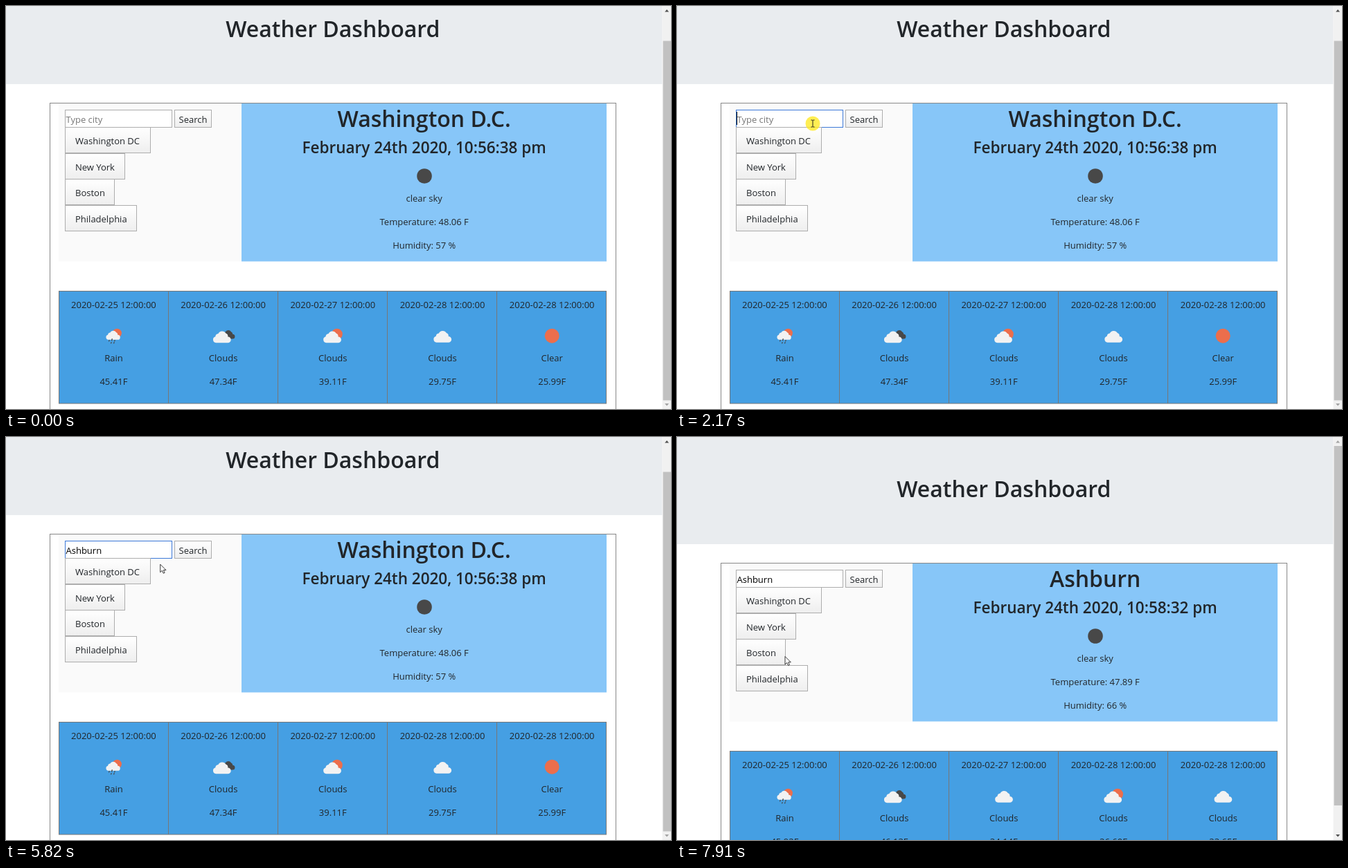
An HTML page that plays this animation: 960x583 px, repeating every 7.99 s.

```html
<!DOCTYPE html>
<html lang="en">
<head>
<meta charset="utf-8">
<title>Weather Dashboard</title>
<style>
html, body { margin: 0; width: 100%; height: 100%; overflow: hidden; background: #fff; }
svg { display: block; width: 100%; height: 100%; }
text { font: 13px "Open Sans", "Noto Sans", sans-serif; fill: #212529; white-space: pre; }
.mid { text-anchor: middle; }
.h1 { font-size: 32px; font-weight: 600; }
.h2 { font-size: 22.5px; font-weight: 600; }
.box { stroke: #adadad; }
</style>
</head>
<body>
<svg viewBox="0 0 960 583">
  <defs>
    <linearGradient id="face" x2="0" y2="1">
      <stop stop-color="#fff"/><stop offset="1" stop-color="#eee"/>
    </linearGradient>
    <path id="cloud" d="M-8.5 9A4.6 4.6 0 0 1-9.3 0A4.6 4.6 0 0 1-5.2-4.2A6.3 6.3 0 0 1 5.8-4.6A4.8 4.8 0 0 1 8.8 .2A4.4 4.4 0 0 1 8.6 9Z"/>
  </defs>
  <g id="page"></g>
  <g id="bar">
    <path d="M947.5 0H960V583H947.5Z" fill="#f1f1f1"/>
    <rect id="thumb" x="948.5" width="11.5" height="520" fill="#c1c1c1"/>
    <path id="up" d="M951 8.5h6l-3-3.5z"/>
    <path id="down" d="M951 575h6l-3 3.5z"/>
  </g>
  <g id="mouse">
    <circle id="halo" r="10.5" fill="#ffe81a" opacity=".75"/>
    <path id="arrow" d="M.5 .5V12L3.2 9.5L5 13.5L6.9 12.7L5.2 8.8H8.8Z" fill="#fff" stroke="#222" stroke-width=".9"/>
    <path id="beam" d="M-2.5-5H-.5L0-4.5L.5-5H2.5M0-4.5V4.5M-2.5 5H-.5L0 4.5L.5 5H2.5" fill="none" stroke="#222"/>
  </g>
</svg>
<script>
const LOOP = 7990, SCROLL = 42, LOADED = 6660, FOCUS = 2170, PRESS = 6370;
const $ = id => document.getElementById(id);
const set = (id, name, value) => $(id).setAttribute(name, value);
const show = (id, on) => set(id, 'display', on ? 'inline' : 'none');

const rect = (x, y, w, h, fill, extra = '') =>
  `<rect x="${x}" y="${y}" width="${w}" height="${h}" fill="${fill}" ${extra}/>`;
const mid = (x, y, s, cls = '') => `<text x="${x}" y="${y}" class="mid ${cls}">${s}</text>`;
const cloud = (x, y, k = 1, fill = '#f2f2f2') =>
  `<use href="#cloud" transform="translate(${x} ${y}) scale(${k})" fill="${fill}"/>`;
const disc = (x, y, r, fill = '#ec6e4c') => `<circle cx="${x}" cy="${y}" r="${r}" fill="${fill}"/>`;

// Icons are drawn around their column's centre.
const icons = {
  rain: disc(5, -4, 6.5) + cloud(-1, -1.5, .79) +
    '<path d="M-6 6l-1 2M-2 4l-1 3M2 6l-1 2M-3 9l-1 2M1 9l-1 2" stroke="#484848" stroke-width="1.3"/>',
  broken: cloud(7, -2.5, .75, '#484848') + cloud(-2, 1),
  few: disc(6, -2.5, 8) + cloud(-1, 1),
  cloudy: cloud(0, 0.5),
  clear: disc(0, 0, 10.5)
};

const before = {
  city: 'Washington D.C.', time: '10:56:38', temp: '48.06', hum: 57,
  days: [['rain', 'Rain', 45.41], ['broken', 'Clouds', 47.34], ['few', 'Clouds', 39.11],
    ['cloudy', 'Clouds', 29.75], ['clear', 'Clear', 25.99]]
};
const after = {
  city: 'Ashburn', time: '10:58:32', temp: '47.89', hum: 66,
  days: [['rain', 'Rain', '45.93'], ['broken', 'Clouds', '46.13'], ['cloudy', 'Clouds', '34.14'],
    ['few', 'Clouds', '36.60'], ['cloudy', 'Clouds', '33.65']]
};

const report = (id, d) => `<g id="${id}">` +
  mid(603.7, 217, d.city, 'h1') +
  mid(603.7, 254.5, `February 24th 2020, ${d.time} pm`, 'h2') +
  disc(604, 288, 10.8, '#484848') +
  mid(603.7, 325, 'clear sky') +
  mid(603.7, 359, `Temperature: ${d.temp} F`) +
  mid(603.7, 393, `Humidity: ${d.hum} %`) +
  d.days.map(([icon, sky, deg], i) => {
    const x = 155.4 + i * 158.2, day = 25 + Math.min(i, 3);
    return mid(x, 479, `2020-02-${day} 12:00:00`) +
      `<g transform="translate(${x} 519.2)">${icons[icon]}</g>` +
      mid(x, 556, sky) + mid(x, 590, deg + 'F');
  }).join('') + '</g>';

const cities = [['Washington DC', 123], ['New York', 86], ['Boston', 71], ['Philadelphia', 103]];

$('page').innerHTML =
  rect(0, 0, 947.5, 155, '#e9ecef') +
  mid(471.8, 87, 'Weather Dashboard', 'h1') +
  rect(63.5, 182.5, 817, 500, '#fff', 'stroke="#888"') +
  rect(76, 183, 264, 228.5, '#fafafa') +
  rect(340, 183, 527, 228.5, '#87c6f8') +
  rect(85.5, 192.5, 154, 25, '#fff', 'id="field" class="box"') +
  '<text id="typed" x="86.5" y="210.5"></text>' +
  rect(0, 195, 1, 19, '#000', 'id="caret"') +
  rect(243.5, 192.5, 53, 25, 'url(#face)', 'id="search" class="box"') +
  mid(270, 210.5, 'Search') +
  cities.map(([name, w], i) => {
    const y = 217.5 + Math.round(i * 37.5);
    return rect(85.5, y, w, 37, 'url(#face)', 'class="box"') +
      `<text x="100" y="${y + 24.5}">${name}</text>`;
  }).join('') +
  rect(76.5, 454.5, 790, 162.5, '#459fe3', 'stroke="#777"') +
  [1, 2, 3, 4].map(i => rect(76 + i * 158, 454, 1, 163, '#777')).join('') +
  report('old', before) + report('new', after);

// start, end, steps, then start point, bend and end point of a curve
const moves = [
  [370, 520, 3, [932, 620], [773, 510], [455, 290]],
  [920, 1070, 3, [455, 290], [330, 215], [262, 167]],
  [1540, 2170, 9, [262, 167], [255, 167], [196, 170]],
  [5670, 6200, 8, [196, 170], [250, 207], [291, 167]],
  [6370, 6510, 3, [291, 167], [288, 166], [286.5, 166]],
  [7370, 7910, 8, [286.5, 166], [406, 225], [155.5, 317]]
];
const keys = [3250, 3560, 3880, 4420, 4630, 4800, 5120];

function mouseAt(t) {
  const [from, to, n, a, b, c] = moves.filter(m => t >= m[0]).pop();
  const step = Math.floor((t - from) / (to - from) * (n - 1) + 1e-6) + 1;
  const u = Math.min(1, step / n), v = 1 - u;
  return a.map((p, i) => v * v * p + 2 * u * v * b[i] + u * u * c[i]);
}

function draw(t) {
  const loaded = t >= LOADED;
  set('page', 'transform', `translate(0 ${loaded ? 0 : -SCROLL})`);
  set('thumb', 'y', loaded ? 13 : 50.5);
  set('up', 'fill', loaded ? '#a3a3a3' : '#505050');
  set('down', 'fill', loaded ? '#505050' : '#a3a3a3');
  show('old', !loaded);
  show('new', loaded);

  const visible = t >= 370;
  const [x, y] = visible ? mouseAt(t) : [0, 0];
  const inRow = !loaded && y > 150 && y < 176;
  const overField = inRow && x > 85 && x < 240;
  const overSearch = inRow && x > 243 && x < 297;
  show('mouse', visible);
  set('mouse', 'transform', `translate(${x} ${y})`);
  show('arrow', !overField);
  show('beam', overField);
  show('halo', t >= FOCUS && t < 2320 || t >= PRESS && t < LOADED);

  const focus = t >= FOCUS && t < PRESS;
  const count = keys.filter(k => t >= k).length;
  $('typed').textContent = 'Ashburn'.slice(0, count) || 'Type city';
  $('typed').style.fill = count ? '#000' : '#767676';
  $('field').style.stroke = focus ? '#3b78d8' : overField ? '#777' : '';
  $('search').style.stroke = overSearch && t < PRESS ? '#777' : '';
  $('search').style.fill = overSearch && t >= PRESS ? '#f0f0f0' : '';

  const last = count ? keys[count - 1] : FOCUS;
  show('caret', focus && Math.floor((t - last) / 540) % 2 === 0);
  set('caret', 'x', 86 + (count ? $('typed').getComputedTextLength() : 0));
}

const start = performance.now();
(function tick() {
  draw((performance.now() - start) % LOOP);
  requestAnimationFrame(tick);
})();
</script>
</body>
</html>
```
